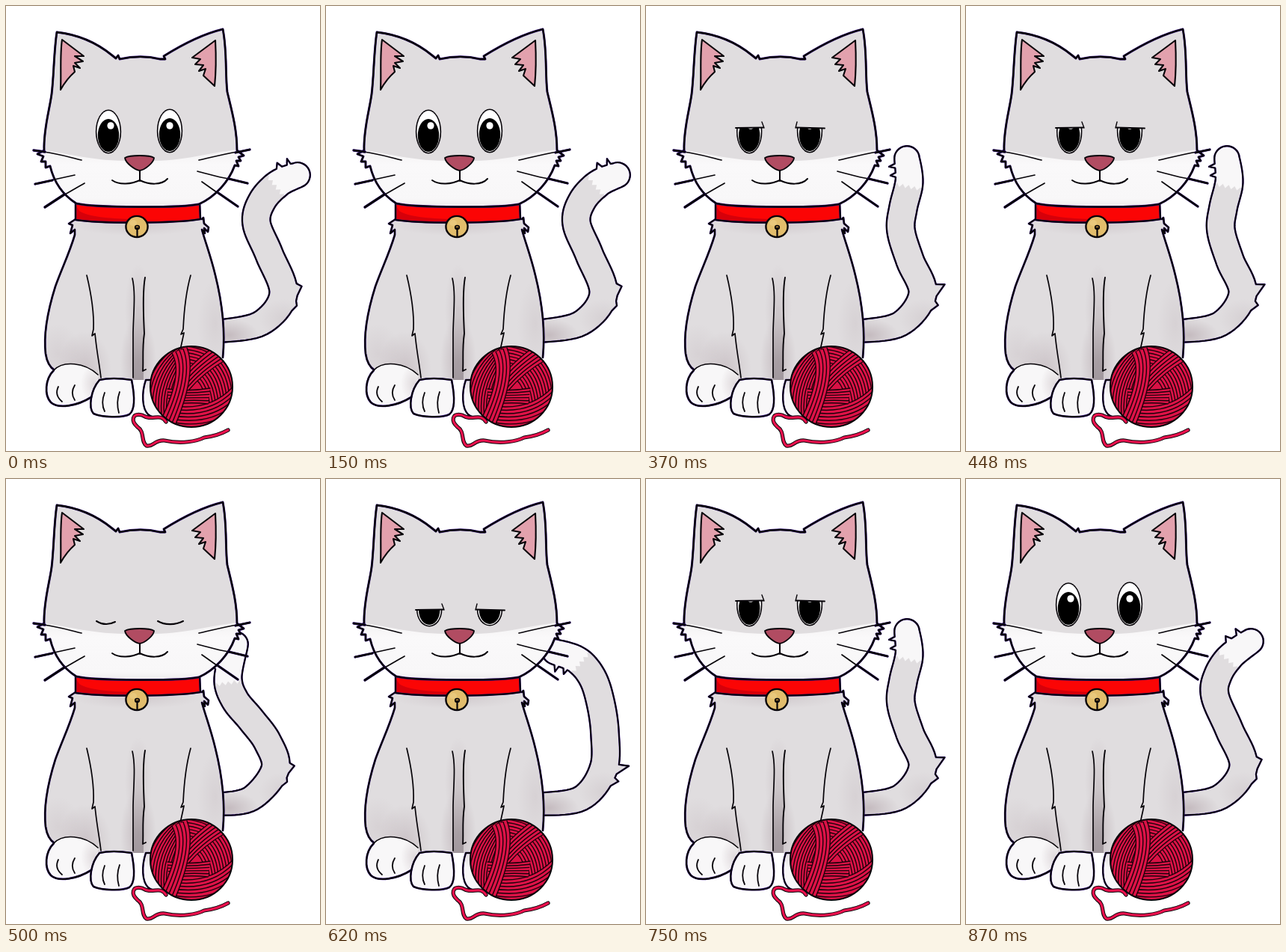
These frames come from a looping animation (420x595 px, 1000 ms). An HTML page with a canvas:

```html
<!DOCTYPE html>
<html lang="en">
<head>
<meta charset="utf-8">
<title>Cat with yarn</title>
<style>
html, body { margin: 0; width: 100%; height: 100%; overflow: hidden; background: #fff; }
canvas { display: block; width: 420px; height: 595px; }
</style>
</head>
<body>
<canvas id="c" width="420" height="595"></canvas>
<script>
const ctx = document.getElementById('c').getContext('2d');
const INK = '#060308', EDGE = '#2b0a78', FUR = '#e0dddf', WHITE = '#f8f7f8';
const TAU = Math.PI * 2;

// Each pose: tail spine, size of the tuft at the bend, eyelid height (0 open, 1 closed)
const poses = {
  rest:  { spine: '285,435 341,424 371,385 352,332 335,290 343,260 365,237 390,226', tuft: 6, lid: 0 },
  up:    { spine: '285,435 340,425 371,385 352,335 333,290 338,258 352,232 358,204', tuft: 10, lid: 152 },
  tall:  { spine: '285,435 340,425 370,385 353,340 341,300 344,270 352,235 349,204', tuft: 11, lid: 163 },
  tuck:  { spine: '285,435 328,427 360,388 350,352 328,322 306,295 297,266 307,221', tuft: 6, lid: 1 },
  curl:  { spine: '285,435 341,427 371,388 373,340 367,298 356,265 336,242 306,231', tuft: 13, lid: 175 },
  lower: { spine: '285,435 340,425 371,385 352,335 333,290 337,262 354,237 381,217', tuft: 6, lid: 0 }
};
const steps = [[250, 'rest'], [370, 'up'], [500, 'tall'], [620, 'tuck'], [750, 'curl'], [870, 'tall'], [1000, 'lower']];

function fill(d, color) {
  ctx.fillStyle = color;
  ctx.fill(new Path2D(d));
}

function line(d, w = 2, color = INK) {
  ctx.lineWidth = w;
  ctx.strokeStyle = color;
  ctx.stroke(d instanceof Path2D ? d : new Path2D(d));
}

function outline(d, w = 2.1) {
  line(d, w + 0.6, EDGE);
  line(d, w);
}

function within(d, draw) {
  ctx.save();
  ctx.clip(d instanceof Path2D ? d : new Path2D(d));
  draw();
  ctx.restore();
}

function oval(x, y, rx, ry, color) {
  ctx.beginPath();
  ctx.ellipse(x, y, rx, ry, 0, 0, TAU);
  ctx.fillStyle = color;
  ctx.fill();
}

function shade(x, y, rx, ry, alpha) {
  ctx.save();
  ctx.translate(x, y);
  ctx.scale(rx, ry);
  const g = ctx.createRadialGradient(0, 0, 0, 0, 0, 1);
  g.addColorStop(0, `rgba(178,164,170,${alpha})`);
  g.addColorStop(1, 'rgba(178,164,170,0)');
  ctx.fillStyle = g;
  ctx.fillRect(-1, -1, 2, 2);
  ctx.restore();
}

// Catmull-Rom samples with unit direction and half width
function sampleSpine(text, per = 10) {
  const p = text.split(' ').map(s => s.split(',').map(Number));
  const last = p.length - 1, out = [];
  for (let k = 0; k <= last * per; k++) {
    const i = Math.min(Math.floor(k / per), last - 1), t = k / per - i;
    const q = [-1, 0, 1, 2].map(o => p[Math.max(0, Math.min(last, i + o))]);
    const at = [], dir = [];
    for (const c of [0, 1]) {
      const [a, b, e, f] = q.map(v => v[c]);
      const m = (e - a) / 2, n = (f - b) / 2;
      const c3 = 2 * b - 2 * e + m + n, c2 = 3 * e - 3 * b - 2 * m - n;
      at.push(((c3 * t + c2) * t + m) * t + b);
      dir.push((3 * c3 * t + 2 * c2) * t + m);
    }
    const len = Math.hypot(...dir) || 1, u = k / (last * per);
    out.push({
      x: at[0], y: at[1], dx: dir[0] / len, dy: dir[1] / len,
      hw: 15 + 3.8 * Math.min(1, u * 3.5) - 2 * Math.max(0, u * 6 - 5)
    });
  }
  return out;
}

// Point beside the spine: negative offsets lie to the left
const beside = (s, off, along = 0) => [s.x - s.dy * off + s.dx * along, s.y + s.dx * off + s.dy * along];

function drawTail(pose) {
  const s = sampleSpine(pose.spine), end = s[s.length - 1];
  const tipTuft = { 63: 7, 67: 8 }, bendTuft = { 18: pose.tuft * 0.5, 21: pose.tuft };
  const path = new Path2D();
  s.forEach((v, i) => path.lineTo(...beside(v, -v.hw - (tipTuft[i] || 0))));
  const a = Math.atan2(end.dy, end.dx);
  path.arc(end.x, end.y, end.hw, a - Math.PI / 2, a + Math.PI / 2);
  for (let i = s.length - 1; i >= 0; i--) {
    const spike = bendTuft[i] || 0;
    path.lineTo(...beside(s[i], s[i].hw + spike, spike * 0.6));
  }
  ctx.fillStyle = FUR;
  ctx.fill(path);
  within(path, () => {
    shade(298, 440, 40, 22, 0.6);
    shade(372, 418, 34, 26, 0.22);
    const cut = 58;
    ctx.beginPath();
    for (let j = 0; j <= 10; j++) {
      ctx.lineTo(...beside(s[cut], -20 + j * 4, j % 2 ? 2.5 : -2.5));
    }
    for (let i = cut; i < s.length; i++) ctx.lineTo(...beside(s[i], 30));
    ctx.lineTo(...beside(end, 30, 30));
    ctx.lineTo(...beside(end, -30, 30));
    for (let i = s.length - 1; i >= cut; i--) ctx.lineTo(...beside(s[i], -30));
    ctx.fillStyle = WHITE;
    ctx.fill();
  });
  outline(path, 1.8);
}

function drawBody() {
  const body = 'M95 283 L84 291 L89 293 L86 300 L92 299 L92 306 C85 330 75 350 66 375 C55 410 50 440 53 465 C55 478 60 484 68 487 L125 500 L186 500 L240 510 L290 470 C293 440 290 400 280 360 C274 335 268 320 263 300 L266 304 L266 297 L271 299 L269 292 L258 281 Z';
  fill(body, FUR);
  within(body, () => {
    shade(175, 293, 85, 14, 0.3);
    shade(177, 405, 18, 60, 0.35);
    shade(177, 475, 24, 60, 0.6);
    shade(105, 485, 36, 50, 0.45);
    shade(70, 465, 30, 40, 0.2);
    shade(280, 425, 24, 60, 0.2);
    const g = ctx.createLinearGradient(0, 400, 0, 500);
    g.addColorStop(0, 'rgba(140,130,136,0)');
    g.addColorStop(1, 'rgba(140,130,136,0.7)');
    fill('M171 400 H184 V500 H170 Z', g);
  });
  outline('M93 285 L84 291 L89 293 L86 304 L92 299 L92 306 C85 330 75 350 66 375 C55 410 50 440 53 465 C55 478 60 484 65 487');
  outline('M262 285 L264 283 L265 291 L271 296 L270 302 L265 297 L266 304 L262 299 C268 320 274 335 280 360 C290 400 293 440 290 470');

  const hind = 'M64 487 C52 499 51 520 60 530 C70 539 95 535 115 523 L124 494 C105 476 76 474 64 487 Z';
  fill(hind, WHITE);
  within(hind, () => shade(118, 505, 18, 26, 0.35));
  outline('M64 487 C52 499 51 520 60 530 C70 539 95 535 114 523');
  line('M64 487 C76 474 105 476 123 493', 1.6);
  line('M70 509 C66 517 69 524 75 529 M92 507 C87 515 88 521 92 527', 1.8);

  const right = 'M187 500 C181 518 182 538 190 546 C198 553 212 552 222 545 L226 500 Z';
  fill(right, WHITE);
  within(right, () => shade(200, 500, 22, 22, 0.5));
  outline(right, 1.8);

  const paw = 'M125 500 C113 514 110 537 117 545 C128 550 156 551 165 546 C174 539 171 515 168 500 C155 498 138 497 125 500 Z';
  fill(paw, WHITE);
  outline(paw, 2);
  line('M132 517 C128 527 129 536 132 542 M152 516 C148 527 149 537 151 544', 1.8);

  line('M108 360 C114 385 118 408 117 432 L115 441 L119 438 L120 447 C122 465 125 480 127 497', 1.7);
  line('M169 364 C174 385 170 415 170 440 V497', 1.7);
  line('M186 363 C182 385 184 415 185 438 C182 458 184 475 183 488 L187 486', 1.9);
  line('M247 360 C240 385 238 410 237 432 L234 439 L238 437 C236 447 234 455 232 465', 1.7);
}

function drawCollar() {
  const band = 'M93 262 L259 262 L260 285 C225 291 125 291 93 286 Z';
  fill(band, '#fb0505');
  within(band, () => fill('M92 264 L98 274 C110 282 140 284 165 285 V292 H92 Z', '#d6000a'));
  outline(band, 2);
  oval(175, 295, 15.8, 15.2, INK);
  oval(175, 295, 13.4, 12.9, '#e2bd6c');
  oval(170, 290, 5, 4, '#e9c87c');
  oval(175.5, 296, 3.6, 3.2, INK);
  oval(175.5, 295.6, 1.8, 1.3, '#a9803a');
  line('M175.5 297 V309', 2.2);
}

function drawHead() {
  const head = 'M68 35 C64 60 64 95 61 118 C58 140 50 165 51 193 L42 198 L50 201 L47 208 L53 208 L53 216 L59 214 C64 235 75 252 94 264 C120 270 235 270 258 265 C280 255 298 235 306 213 L311 214 L308 207 L314 207 L311 202 L318 200 L309 193 C309 165 302 140 296 115 C293 90 296 60 290 31 C265 37 235 52 211 67 L213 71 L206 71 C190 67 170 67 152 71 L150 66 L147 70 L142 66 C120 48 95 38 68 35 Z';
  fill(head, FUR);
  within(head, () => {
    const g = ctx.createLinearGradient(0, 192, 0, 270);
    g.addColorStop(0, '#f3f1f2');
    g.addColorStop(0.25, '#faf9fa');
    g.addColorStop(0.85, '#f8f7f8');
    g.addColorStop(1, '#ebe9ea');
    fill('M40 192 C80 195 105 206 160 207 L198 207 C250 206 275 194 322 191 V275 H40 Z', g);
  });
  outline(head, 2.3);

  const leftEar = 'M75 45 L104 67 L92 67 L103 74 L92 76 L99 83 L90 80 L92 88 C84 95 78 103 73 112 C74 90 72 65 75 45 Z';
  const rightEar = 'M280 46 L249 69 L260 71 L253 78 L264 79 L258 87 L267 84 L264 93 L279 107 C281 88 281 65 280 46 Z';
  for (const ear of [leftEar, rightEar]) {
    fill(ear, '#e2a1ad');
    line(ear, 2.1);
  }

  line('M50 195 C68 197 84 202 101 206 M60 233 L92 226 M77 253 C86 248 96 242 105 237', 1.7);
  line('M258 206 C276 202 292 198 309 195 M256 221 C272 225 284 229 298 231 M262 235 L286 252', 1.7);
  outline('M37 193 L52 195 M39 238 L62 233 M52 269 L78 252', 2.7);
  outline('M326 192 L307 196 M323 237 L298 231 M310 268 L284 250', 2.7);

  const nose = 'M159 203 C166 199 192 199 198 203 C198 209 186 219 179 220 C172 219 160 210 159 203 Z';
  fill(nose, '#b14c62');
  line(nose, 1.8);
  line('M179 220 V234 M142 233 C152 240 168 238 179 233 C191 239 208 240 216 231', 2);
}

function drawEye(x, y, shine, lid) {
  const cy = Math.max(y, lid), ry = y + 29.5 - cy, pupil = Math.min(22, ry - 3);
  ctx.save();
  if (lid) {
    ctx.beginPath();
    ctx.rect(x - 30, lid, 60, 60);
    ctx.clip();
  }
  oval(x, cy, 17.2, ry, INK);
  oval(x, cy, 15.6, ry - 1.6, '#fff');
  oval(x, cy + ry - 2.5 - pupil, 14.2, pupil, '#000');
  oval(shine, 160, 4.6, 4.8, '#fff');
  ctx.restore();
}

function drawEyes(lid) {
  if (lid === 1) {
    line('M121 190 C129 195 138 195 146 191 M203 190 C213 196 227 195 237 190', 2.1);
    return;
  }
  const shift = lid ? 1.2 : 0;
  drawEye(137 + shift, 168, 140, lid);
  drawEye(219, 167, 219, lid);
  if (lid) {
    line(`M120 ${lid} L157 ${lid - 0.5} M201 ${lid - 0.5} L239 ${lid + 0.5}`, 1.9);
    line(`M155 ${lid - 8} L158 ${lid} M202 ${lid - 8} L200 ${lid}`, 1.4);
  }
}

// Parallel strands between two quadratic curves
function strands(a, b, n) {
  const [p, q] = [a, b].map(v => v.split(' ').map(Number));
  ctx.beginPath();
  ctx.moveTo(p[0], p[1]);
  ctx.quadraticCurveTo(p[2], p[3], p[4], p[5]);
  ctx.lineTo(q[4], q[5]);
  ctx.quadraticCurveTo(q[2], q[3], q[0], q[1]);
  ctx.fillStyle = '#dd1247';
  ctx.fill();
  ctx.lineWidth = 1.4;
  ctx.strokeStyle = '#1c0109';
  for (let i = 0; i <= n; i++) {
    const m = p.map((v, k) => v + (q[k] - v) * i / n);
    ctx.beginPath();
    ctx.moveTo(m[0], m[1]);
    ctx.quadraticCurveTo(m[2], m[3], m[4], m[5]);
    ctx.stroke();
  }
}

function drawYarn() {
  const thread = 'M214 556 C206 543 196 556 182 547 C168 544 167 555 176 563 C186 569 180 583 188 588 C197 590 198 580 212 581 C235 586 255 582 265 577 C280 575 290 571 297 567';
  line(thread, 5.2);
  line(thread, 3.2, '#ea114d');
  const ball = new Path2D();
  ball.ellipse(248, 509, 55, 54, 0, 0, TAU);
  ctx.fillStyle = '#d81145';
  ctx.fill(ball);
  within(ball, () => {
    strands('188 520 194 474 238 450', '228 570 212 510 264 450', 10);
    strands('236 450 314 456 306 545', '230 494 272 486 270 566', 10);
    strands('308 504 276 544 218 534', '296 566 262 580 214 568', 8);
    strands('226 508 242 482 278 456', '244 514 264 490 296 472', 5);
    strands('216 512 245 516 273 511', '218 533 245 529 270 532', 5);
    strands('222 464 238 492 206 556', '242 457 256 492 224 566', 4);
  });
  line(ball, 2);
}

function draw(pose) {
  ctx.fillStyle = '#fff';
  ctx.fillRect(0, 0, 420, 595);
  drawTail(pose);
  drawBody();
  drawCollar();
  drawHead();
  drawEyes(pose.lid);
  drawYarn();
}

let shown;
function tick() {
  const t = performance.now() % 1000;
  const name = steps.find(s => t < s[0])[1];
  if (name !== shown) draw(poses[shown = name]);
  requestAnimationFrame(tick);
}

ctx.lineCap = ctx.lineJoin = 'round';
tick();
</script>
</body>
</html>
```
